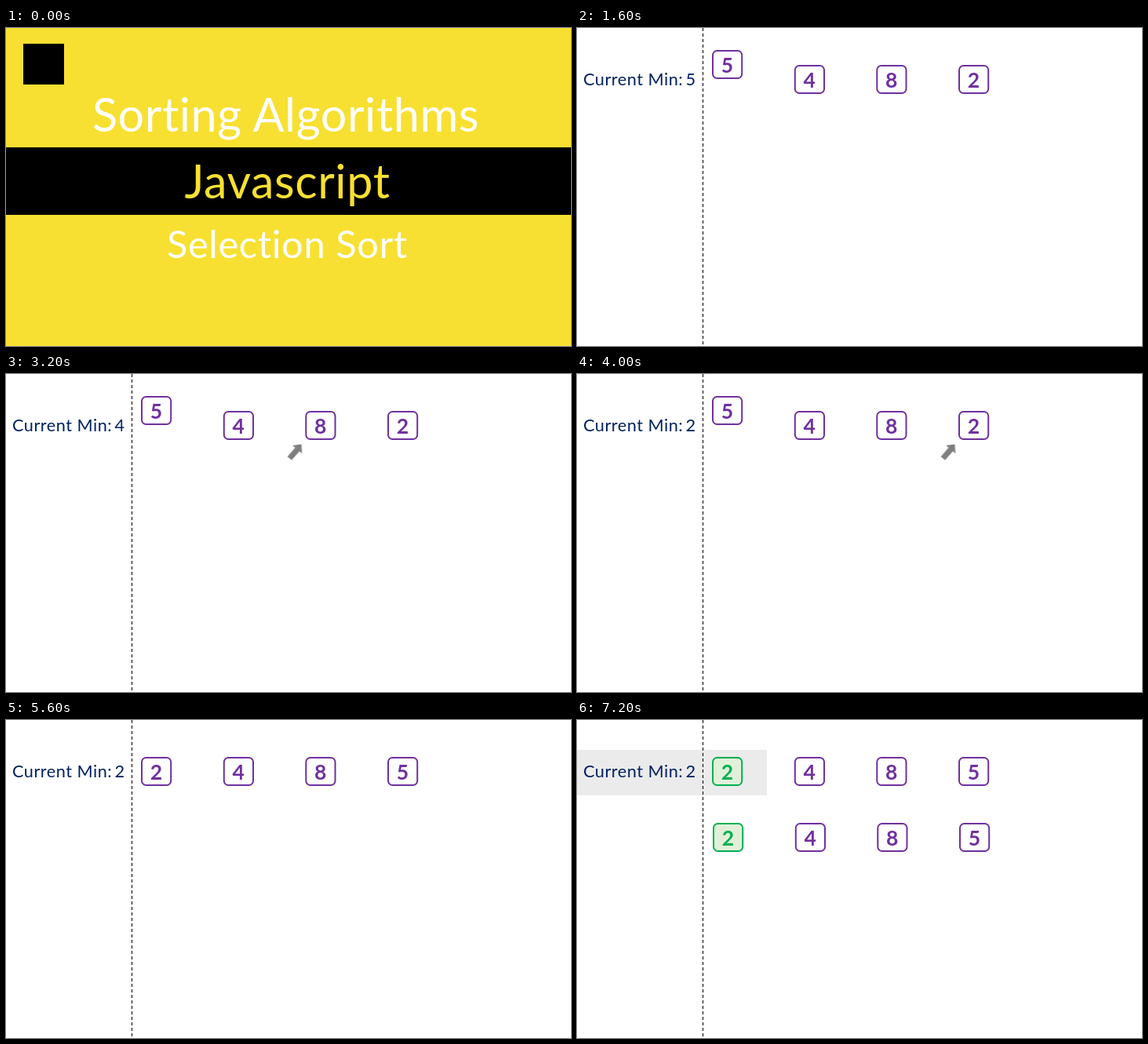
These frames come from a looping animation (720 px wide and 405 px high, 8000 ms). An HTML page:

```html
<!DOCTYPE html>
<html lang="en">
<head>
<meta charset="utf-8">
<title>Selection Sort</title>
<style>
html, body { margin: 0; width: 100%; height: 100%; overflow: hidden; background: #fff; }
svg { display: block; width: 100%; height: 100%; font-family: Lato, "Open Sans", sans-serif; }
text { fill: currentColor; }

.heading { text-anchor: middle; font-size: 59.3px; letter-spacing: .6px; }
.heading .small { font-size: 48.8px; }
.cell { color: #7030a0; fill: #fff; font-size: 26.5px; font-weight: 700; text-anchor: middle; }
.done { color: #00b050; fill: #e2f0d9; }
.min { color: #002060; font-size: 21.7px; letter-spacing: .5px; }

/* Ten steps of 800 ms, all hard cuts */
.title, .lift, .before, .after, .panel, .min5, .min4, .min2, .arrow, .band, .sort, .copy {
  animation: 8s step-end infinite;
}
.title { animation-name: title; }
.lift { animation-name: lift; }
.before { animation-name: before; }
.after { animation-name: after; }
.panel { animation-name: panel; }
.min5 { animation-name: min5; }
.min4 { animation-name: min4; }
.min2 { animation-name: min2; }
.arrow { animation-name: arrow; }
.band { animation-name: band; }
.sort { animation-name: sort; }
.copy { animation-name: copy; }

@keyframes title { 0% { visibility: visible } 10%, 100% { visibility: hidden } }
@keyframes lift { 0% { transform: none } 20%, 100% { transform: translateY(-19px) } }
@keyframes before { 0% { visibility: visible } 70%, 100% { visibility: hidden } }
@keyframes after { 0% { visibility: hidden } 70%, 100% { visibility: visible } }
@keyframes panel { 0% { visibility: hidden } 20%, 100% { visibility: visible } }
@keyframes min5 { 0% { visibility: hidden } 20% { visibility: visible } 30%, 100% { visibility: hidden } }
@keyframes min4 { 0% { visibility: hidden } 30% { visibility: visible } 50%, 100% { visibility: hidden } }
@keyframes min2 { 0% { visibility: hidden } 50%, 100% { visibility: visible } }
@keyframes arrow {
  0% { visibility: hidden; transform: none }
  30% { visibility: visible; transform: none }
  40% { visibility: visible; transform: translateX(104.5px) }
  50% { visibility: visible; transform: translateX(209.5px) }
  60%, 100% { visibility: hidden; transform: none }
}
@keyframes band { 0% { visibility: hidden } 80%, 100% { visibility: visible } }
@keyframes sort {
  0% { color: #7030a0; fill: #fff }
  80%, 100% { color: #00b050; fill: #e2f0d9 }
}
@keyframes copy { 0% { visibility: hidden } 90%, 100% { visibility: visible } }
</style>
</head>
<body>
<svg viewBox="0 0 720 405">
  <defs>
    <rect id="box" x="173" y="48" width="37.2" height="35" rx="5.5" stroke="currentColor" stroke-width="2"/>
    <g id="four"><use href="#box"/><text x="191.5" y="76">4</text></g>
    <g id="eight"><use href="#box"/><text x="191.5" y="76">8</text></g>
    <g id="two"><use href="#box"/><text x="191.5" y="76">2</text></g>
    <g id="five"><use href="#box"/><text x="191.5" y="76">5</text></g>
  </defs>

  <rect class="band" y="38" width="242" height="58" fill="#ebebeb"/>

  <g class="panel">
    <path d="M160.5 0V404" stroke="#000" stroke-dasharray="4 3"/>
    <text class="min" x="8" y="73">Current Min:</text>
  </g>
  <g class="min">
    <text class="min5" x="138.4" y="73">5</text>
    <text class="min4" x="138.4" y="73">4</text>
    <text class="min2" x="138.4" y="73">2</text>
  </g>

  <g class="cell">
    <use href="#four" x="104.8"/>
    <use href="#eight" x="209.3"/>
    <g class="before">
      <g class="lift"><use href="#five"/></g>
      <use href="#two" x="314"/>
    </g>
    <g class="after">
      <g class="sort"><use href="#two"/></g>
      <use href="#five" x="314"/>
    </g>
  </g>

  <g class="copy">
    <g class="cell" transform="translate(1 84)">
      <g class="done"><use href="#two"/></g>
      <use href="#four" x="104.8"/>
      <use href="#eight" x="209.3"/>
      <use href="#five" x="314"/>
    </g>
  </g>

  <path class="arrow" fill="#7f7f7f" d="M272 89.5L272.8 101.3L269.4 98.4L259.6 109.8L254.2 105.2L264 93.8L260.6 90.9Z"/>

  <g class="title">
    <rect width="720" height="405" fill="#f7e031"/>
    <rect y="152" width="720" height="86"/>
    <rect x="22" y="20" width="52" height="52"/>
    <g class="heading">
      <text x="356.5" y="132" color="#fff">Sorting Algorithms</text>
      <text x="358.5" y="217" color="#f7e031">Javascript</text>
      <text class="small" x="358.5" y="293" color="#fff">Selection Sort</text>
    </g>
  </g>
</svg>
</body>
</html>
```
